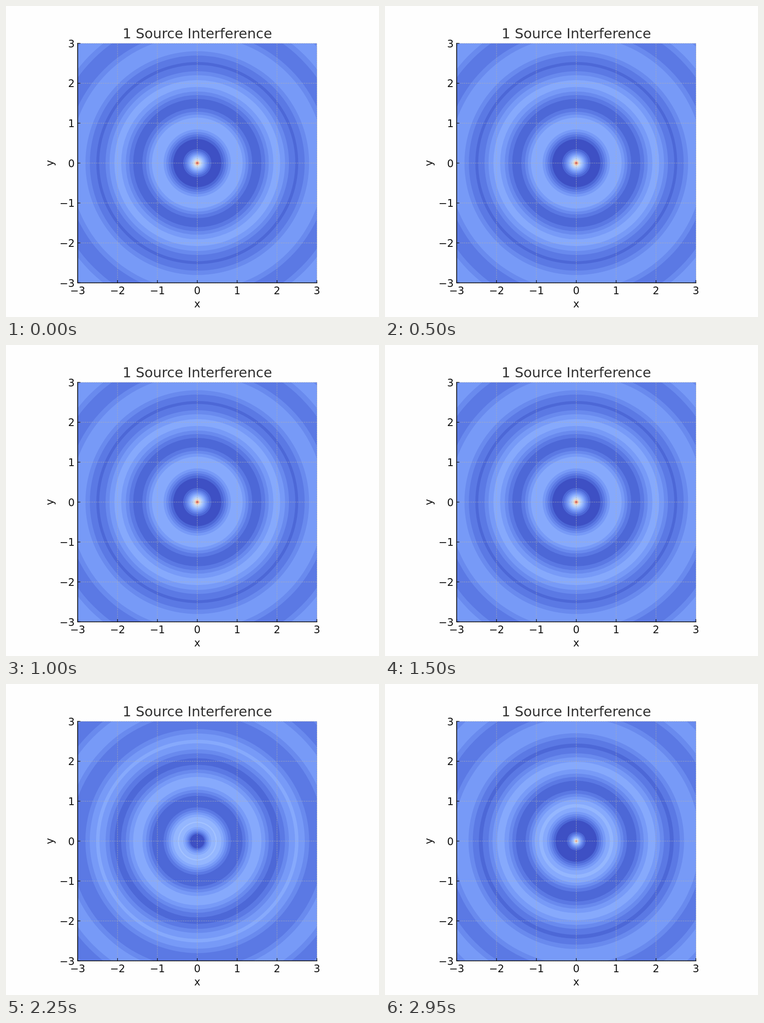
Write an HTML page with a canvas that moves like this. It is 820x683 px and loops after 3000 ms.

```html
<!DOCTYPE html>
<html lang="en">
<head>
<meta charset="utf-8">
<title>1 Source Interference</title>
<style>
  html, body { margin: 0; width: 100%; height: 100%; overflow: hidden; background: #fefefe; }
  canvas, svg { position: absolute; left: 0; top: 0; display: block; }
  text { font: 22.78px "DejaVu Sans", Verdana, sans-serif; fill: #111; }
  .title { font-size: 30.37px; fill: #303030; }
  .mid { text-anchor: middle; }
  .end { text-anchor: end; }
  .grid { stroke: #b0b0b0; stroke-opacity: .75; stroke-width: .95; stroke-dasharray: 3.5 1.52; }
  .tick { stroke: #000; stroke-width: 1.2; }
  .spine { fill: none; stroke: #000; stroke-width: 1.7; stroke-linecap: square; }
</style>
</head>
<body>
<canvas id="field" width="820" height="683"></canvas>
<svg id="axes" width="820" height="683" viewBox="0 0 820 683">
  <g id="marks"></g>
  <path class="spine" d="M157.5 82V608H683.5"/>
  <text class="title mid" x="420.5" y="71">1 Source Interference</text>
  <text class="mid" x="420.5" y="662">x</text>
  <text class="mid" transform="translate(103.5 345) rotate(-90)">y</text>
</svg>
<script>
const LEFT = 157.5, TOP = 82, SIZE = 526, UNIT = SIZE / 6;
const CX = LEFT + SIZE / 2, CY = TOP + SIZE / 2;
const RIGHT = LEFT + SIZE, BOTTOM = TOP + SIZE;

// Axes: grid lines, inward ticks and labels
const line = (cls, x1, y1, x2, y2) =>
  `<line class="${cls}" x1="${x1}" y1="${y1}" x2="${x2}" y2="${y2}"/>`;
const label = (cls, x, y, s) => `<text class="${cls}" x="${x}" y="${y}">${s}</text>`;

let marks = '';
for (let n = -3; n <= 3; n++) {
  const x = CX + n * UNIT, y = CY - n * UNIT;
  const name = n < 0 ? '\u2212' + -n : n;
  marks += line('grid', x, BOTTOM, x, TOP) + line('grid', LEFT, y, RIGHT, y)
    + line('tick', x, BOTTOM, x, BOTTOM - 6) + line('tick', LEFT, y, LEFT + 6, y)
    + label('mid', x, 633, name) + label('end', 151, y + 8.5, name);
}
document.getElementById('marks').innerHTML = marks;

// Diverging blue to red scale
const STOPS = [
  [59, 76, 192], [77, 104, 215], [98, 130, 234], [119, 154, 247], [141, 176, 254],
  [163, 194, 255], [184, 208, 249], [204, 217, 238], [221, 221, 221], [236, 211, 197],
  [245, 196, 173], [247, 177, 148], [244, 154, 123], [236, 127, 99], [222, 96, 77],
  [203, 62, 56], [180, 4, 38]
];
function heat(v) {
  const p = v * (STOPS.length - 1);
  const i = Math.min(Math.floor(p), STOPS.length - 2);
  const mix = STOPS[i].map((a, k) => Math.round(a + (STOPS[i + 1][k] - a) * (p - i)));
  return `rgb(${mix})`;
}

// Contour bands of equal height
const BANDS = 24, LOW = -1.433, STEP = 0.4085, CORE = 0.0142;
const COLORS = Array.from({ length: BANDS }, (_, i) => heat(i ? (i + 0.5) / BANDS : 0.01));

function band(r, phase) {
  const d = Math.max(r, CORE);
  const z = Math.cos(2 * Math.PI * (d - phase)) / Math.sqrt(d);
  return Math.max(0, Math.min(BANDS - 1, Math.floor((z - LOW) / STEP)));
}

const ctx = document.getElementById('field').getContext('2d');
ctx.beginPath();
ctx.rect(LEFT, TOP, SIZE, SIZE);
ctx.clip();

function draw(phase) {
  let last = band(4.3, phase);
  ctx.fillStyle = COLORS[last];
  ctx.fillRect(LEFT, TOP, SIZE, SIZE);
  for (let i = 4300; i > 0; i--) {
    const r = i / 1000, b = band(r, phase);
    if (b === last) continue;
    last = b;
    ctx.fillStyle = COLORS[b];
    ctx.beginPath();
    ctx.arc(CX, CY, r * UNIT, 0, 2 * Math.PI);
    ctx.fill();
  }
}

// One wavelength outwards every ten steps of 50 ms
let start, shown = 0;
function tick(now) {
  start ??= now;
  const step = Math.floor(((now - start + 1) % 3000) / 50) % 10;
  if (step !== shown) draw((shown = step) / 10);
  requestAnimationFrame(tick);
}
draw(0);
requestAnimationFrame(tick);
</script>
</body>
</html>
```
